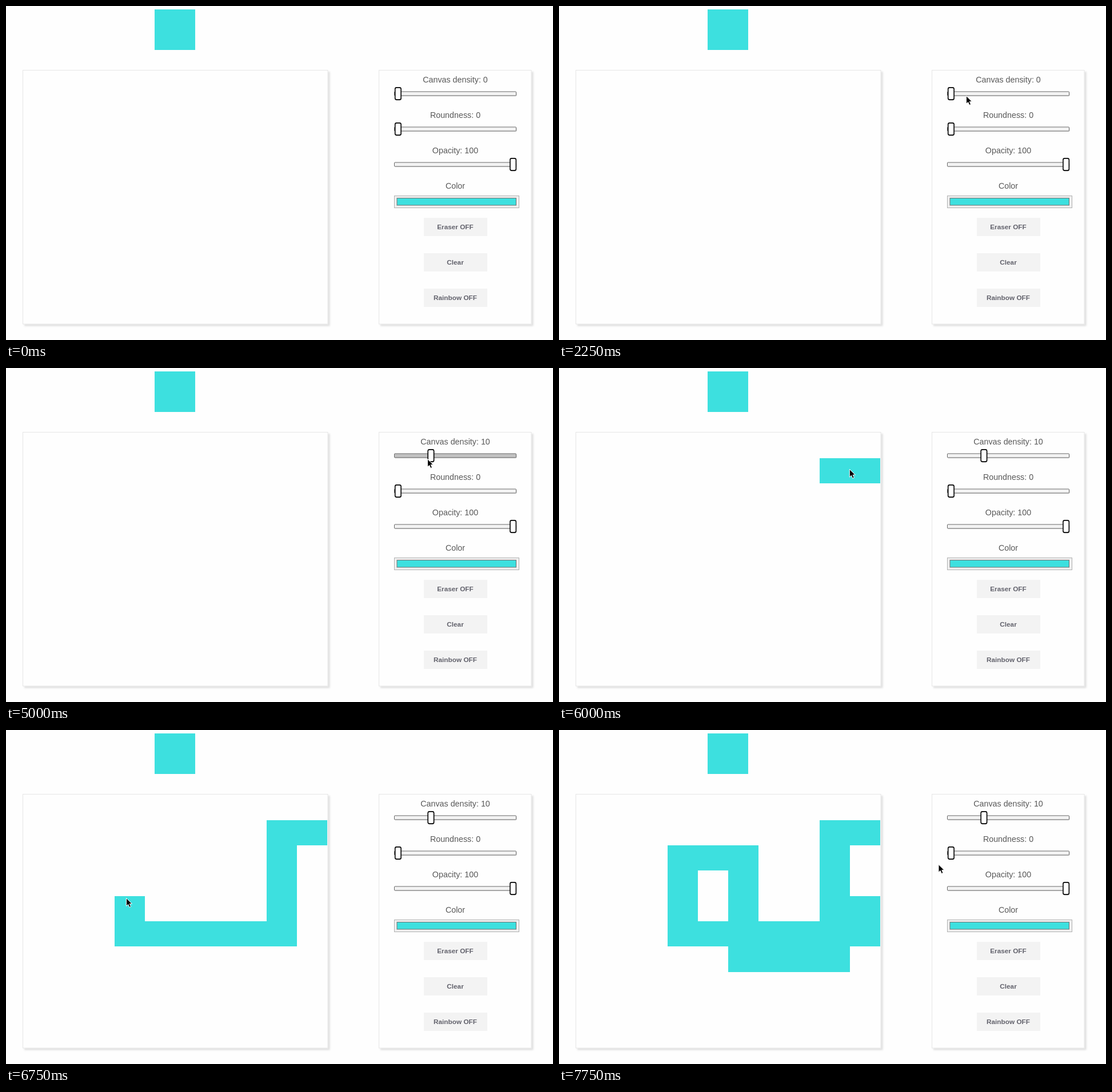
Recreate the animation shown at these times as an HTML page. Size 957 px wide and 585 px high, loop 8000 ms.

```html
<!DOCTYPE html>
<html lang="en">
<head>
<meta charset="utf-8">
<title>Sketch pad</title>
<style>
html, body { margin: 0; width: 100%; height: 100%; overflow: hidden; background: #fefefe; }
svg { display: block; width: 957px; height: 585px; }
text { font-family: "Liberation Sans", Arial, sans-serif; text-anchor: middle; }
.label { font-size: 14.3px; fill: #585858; }
.button { font-size: 11.8px; font-weight: bold; fill: #62626c; }
</style>
</head>
<body>
<svg id="stage" viewBox="0 0 957 585" xmlns="http://www.w3.org/2000/svg">
  <defs>
    <filter id="shade" x="-5%" y="-5%" width="112%" height="112%">
      <feDropShadow dx="3" dy="3" stdDeviation="1.6" flood-color="#000" flood-opacity=".12"/>
    </filter>
  </defs>
</svg>
<script>
const NS = "http://www.w3.org/2000/svg";
const stage = document.getElementById("stage");
const TEAL = "#3de0df";
const LOOP = 8000, STEP = 250;
const PRESS = 2750, DRAG_END = 5000, RELEASE = 5750;
const GRID = 10, CELL_W = 53.25, CELL_H = 44.35, LEFT = 30.3, TOP = 113.3;
const SLIDE_X = 685.5, UNIT = 5.75;

function add(tag, attrs, parent = stage) {
  const el = document.createElementNS(NS, tag);
  for (const k in attrs) el.setAttribute(k, attrs[k]);
  parent.appendChild(el);
  return el;
}

function rect(x, y, width, height, fill, more = {}, parent = stage) {
  return add("rect", { x, y, width, height, fill, ...more }, parent);
}

function text(str, y, cls) {
  const el = add("text", { x: 786, y, class: cls });
  el.textContent = str;
  return el;
}

function panel(x, width) {
  rect(x, 112.5, width, 444.5, "#fefefe", { stroke: "#e6e6e6", filter: "url(#shade)" });
}

function slider(name, y, value) {
  const label = text(name, y - 19.5, "label");
  rect(680.5, y - 2, 213, 6.5, "#000", { opacity: .14, rx: 1 });
  const track = rect(679.5, y - 3.5, 213, 7, "#f3f3f3", { stroke: "#666", rx: 1 });
  const thumb = add("g", {});
  rect(-4.5, -9.8, 11, 21.8, "#000", { opacity: .2, rx: 3 }, thumb);
  rect(-4.8, -10.6, 10.4, 21.2, "#fff", { stroke: "#000", "stroke-width": 1.6, rx: 2.6 }, thumb);
  const set = v => thumb.setAttribute("transform", `translate(${SLIDE_X + v * UNIT} ${y})`);
  set(value);
  return { label, track, set };
}

function button(name, y) {
  rect(731, y, 111, 32, "#f3f3f3");
  text(name, y + 20, "button");
}

// Static layout
rect(260, 6, 71, 71, TEAL);
panel(29.5, 533.5);
panel(652.5, 266.5);
const drawing = add("g", { fill: TEAL, "shape-rendering": "crispEdges" });
const density = slider("Canvas density: 0", 153.5, 0);
slider("Roundness: 0", 215.5, 0);
slider("Opacity: 100", 277.5, 35);
text("Color", 320, "label");
rect(679.5, 332.5, 218, 21, "#f0f0f0", { stroke: "#b0b0b0" });
rect(684, 336.5, 208.5, 12.5, TEAL, { stroke: "#707070" });
["Eraser OFF", "Clear", "Rainbow OFF"].forEach((name, i) => button(name, 371 + 62 * i));

const cursor = add("path", {
  d: "M0 0V13.8L3.2 10.9 5.4 16 8 14.9 5.8 9.9H10Z",
  fill: "#000", stroke: "#fff", "stroke-width": 1, "stroke-linejoin": "round"
});

// Turning points of the pointer: time, x, y
const route = [
  [500, 755, 1], [1250, 690, 160], [1750, 689, 156], [2250, 712.5, 157.5],
  [PRESS, 684, 156], [3750, 713.5, 157.5], [4000, 717, 158],
  [4250, 737.5, 159.5], [DRAG_END, 737.5, 159.5], [5250, 701, 153], [5500, 701, 153],
  [RELEASE, 618, 166], [6060, 482, 180], [6250, 462.5, 316.5], [6320, 465, 357],
  [6640, 216, 357], [6750, 210.5, 294.5], [6870, 214, 224], [7060, 322, 224],
  [7250, 322, 400], [7440, 480, 400], [7500, 482, 357], [7600, 535, 357],
  [7660, 535, 315], [7750, 664, 235.5]
];

function pointerAt(t) {
  const i = route.findIndex(p => p[0] > t);
  if (i < 0) return route[route.length - 1].slice(1);
  if (i === 0) return null;
  const [t0, x0, y0] = route[i - 1], [t1, x1, y1] = route[i];
  const k = (t - t0) / (t1 - t0);
  return [x0 + (x1 - x0) * k, y0 + (y1 - y0) * k];
}

// Each grid cell is painted when the pointer first crosses it
const cells = new Map();
const colX = c => Math.floor(LEFT + CELL_W * c);
const rowY = r => Math.round(TOP + CELL_H * r);
for (let t = RELEASE; t < LOOP; t += 2) {
  const [x, y] = pointerAt(t);
  const c = Math.floor((x - LEFT) / CELL_W), r = Math.floor((y - TOP) / CELL_H);
  const key = c + "," + r;
  if (c >= GRID || cells.has(key)) continue;
  const el = rect(colX(c), rowY(r), colX(c + 1) - colX(c), rowY(r + 1) - rowY(r), TEAL, {}, drawing);
  cells.set(key, { el, time: t });
}

const show = (el, on) => { el.style.display = on ? "" : "none"; };

function draw(ms) {
  const t = Math.floor((ms % LOOP) / STEP) * STEP;
  const p = pointerAt(t);
  show(cursor, p);
  if (p) cursor.setAttribute("transform", `translate(${p})`);

  const [dragX] = pointerAt(Math.min(Math.max(t, PRESS), DRAG_END));
  const value = Math.floor((dragX - 678.5) / UNIT);
  density.label.textContent = "Canvas density: " + value;
  density.set(value);
  density.track.setAttribute("fill", t >= PRESS && t < RELEASE ? "#c2c2c2" : "#f3f3f3");

  for (const { el, time } of cells.values()) show(el, time <= t);
}

const start = performance.now();
function tick() {
  draw(performance.now() - start);
  requestAnimationFrame(tick);
}
draw(0);
requestAnimationFrame(tick);
</script>
</body>
</html>
```
